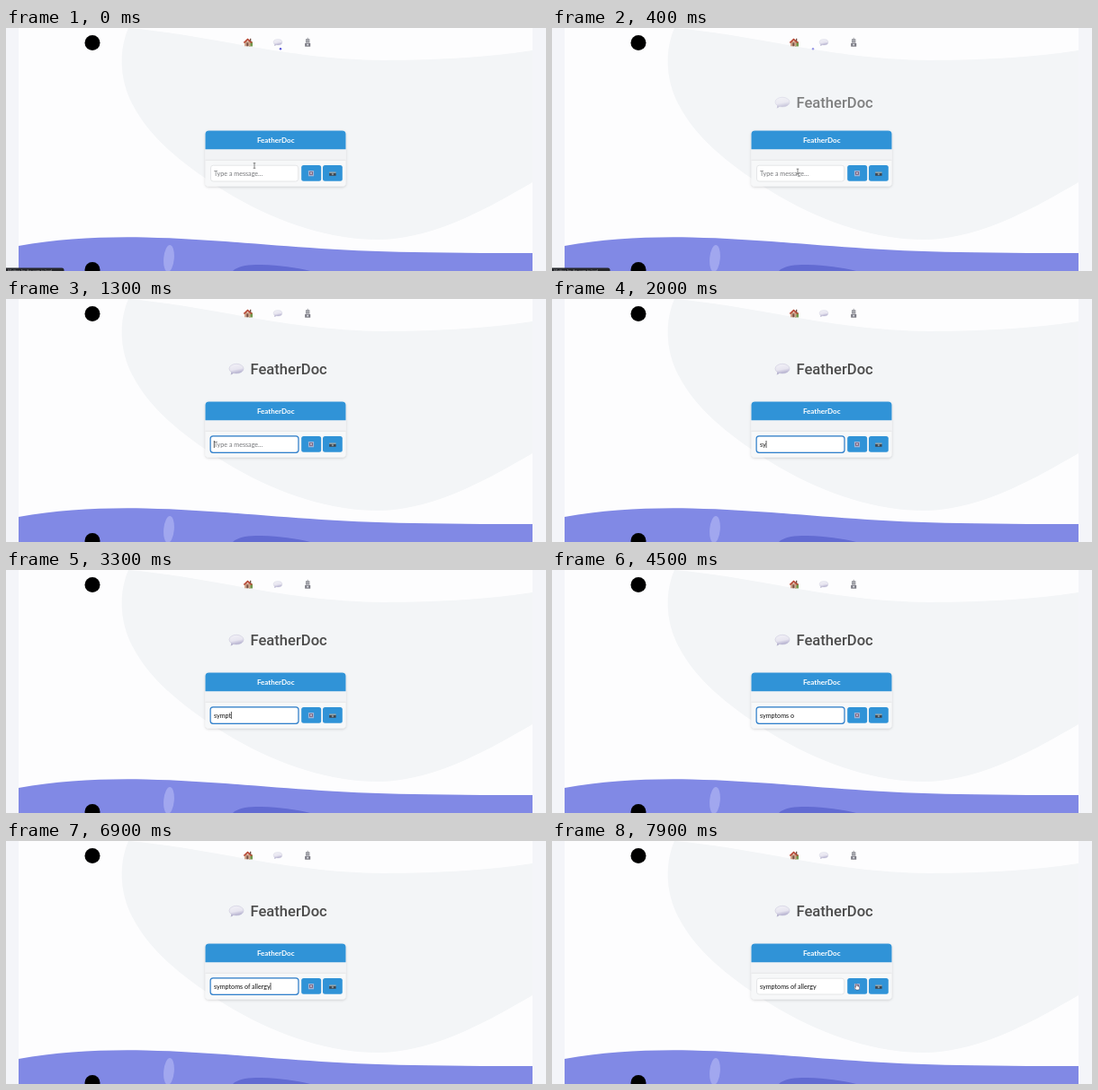
An HTML page for the animation above (8000 ms loop, 600 px wide and 271 px high).

```html
<!DOCTYPE html>
<html lang="en">
<head>
<meta charset="utf-8">
<title>Chat page</title>
<style>
  html, body { margin: 0; width: 100%; height: 100%; overflow: hidden; background: #f4f5f9; }
  svg { display: block; width: 100%; height: 100%; }
  text { font-family: Lato, sans-serif; white-space: pre; }
</style>
</head>
<body>
<svg viewBox="0 0 600 271">
  <defs>
    <linearGradient id="puff" x1="0" y1="0" x2="0.3" y2="1">
      <stop offset="0" stop-color="#f3f2f8"/>
      <stop offset=".65" stop-color="#e7e5f0"/>
      <stop offset="1" stop-color="#b9b5d2"/>
    </linearGradient>
    <filter id="shadow" x="-10%" y="-20%" width="120%" height="140%">
      <feDropShadow dx="0" dy="1" stdDeviation="1.8" flood-color="#000" flood-opacity=".17"/>
    </filter>
    <g id="bubble">
      <path d="M-2.500 4Q-5 6.500-6.500 6.600Q-5.500 5-5.800 3Z" fill="#b5b1cd"/>
      <ellipse cy="-.3" rx="8" ry="5.400" fill="url(#puff)" stroke="#c3c0d6" stroke-width=".5"/>
    </g>
    <clipPath id="page"><path d="M14 0H585V271H14Z"/></clipPath>
  </defs>

  <rect width="600" height="271" fill="#f4f5f9"/>
  <g clip-path="url(#page)">
    <rect x="14" width="571" height="271" fill="#fdfdfe"/>
    <path fill="#f3f5f7" d="M136 0C125 26 126 58 141 86C158 119 190 146 222 168C280 209 350 236 414 236C475 235 532 203 585 172V25C530 33 480 36 420 36C310 35 235 9 136 0Z"/>
    <path fill="#8189e5" d="M14 243C60 235 105 232.500 155 233.500C260 236 330 249 470 250.300C510 250.800 550 251 585 251V271H14Z"/>
    <ellipse cx="181" cy="257" rx="5.800" ry="15" fill="#a1a7ef" transform="rotate(5 181 257)"/>
    <path fill="#626bd2" d="M252 271C258 265 270 263.800 284 264C304 264.500 322 267 338 271Z"/>
  </g>

  <circle cx="96" cy="16.500" r="8.500"/>
  <circle cx="96" cy="269.500" r="8.500"/>

  <!-- Navigation -->
  <g>
    <path fill="#70984c" d="M270 15.500h4v5h-4z"/>
    <path fill="#d0a58c" d="M265 15h6.500v5.300h-6.500z"/>
    <path fill="#b84b38" d="M263.700 16L268.500 11.400L274 16L272.500 17L268.500 14L265 17Z"/>
    <path fill="#765045" d="M267.300 16.500h2v3.800h-2zM271 11.700h1.300v3H271z"/>
  </g>
  <use href="#bubble" transform="translate(302 16) scale(.6)"/>
  <g fill="#92939a">
    <path d="M333 12.300h4.400v4.200H333zM334.800 10.800h.8v2h-.8z"/>
    <path fill="#777780" d="M332.200 16.900h6v3.800h-6z"/>
    <path fill="#d9dce2" d="M333.800 13.700h1v1h-1zM335.700 13.700h1v1h-1zM334.100 17.700h2.200v1.700h-2.200z"/>
  </g>
  <circle id="dot" cy="23.200" r="1.200" fill="#5755d8"/>

  <g id="title">
    <use href="#bubble" x="256" y="78"/>
    <text x="271.500" y="84" fill="#4c4c4c" style="font:500 16.600px Roboto,sans-serif">FeatherDoc</text>
  </g>

  <!-- Chat card -->
  <rect x="221.500" y="114.500" width="156" height="62" rx="4" fill="#f7f8f9" filter="url(#shadow)"/>
  <path fill="#f2f3f5" d="M221.500 135h156v12.300h-156z"/>
  <path fill="#3093d7" d="M221.500 135.200V118.500a4 4 0 0 1 4-4H373.500a4 4 0 0 1 4 4V135.200Z"/>
  <path stroke="#dedfe1" stroke-width=".7" d="M221.500 147.300h156"/>
  <text x="299.700" y="127.800" font-size="8" font-weight="700" fill="#fff" text-anchor="middle">FeatherDoc</text>

  <rect x="227.500" y="153.200" width="97.200" height="17.800" rx="2.800" fill="#fff" stroke="#dcdde0" stroke-width=".7"/>
  <rect id="ring" x="227.100" y="152.800" width="97.900" height="18.500" rx="3" fill="none" stroke="#2f80cd" stroke-width="1.200"/>
  <text id="entry" x="231" y="164.500" font-size="7.150"></text>
  <path id="caret" stroke="#111" stroke-width=".7" d="M0 158v8"/>

  <g fill="#3093d7">
    <rect x="328.200" y="152.900" width="22" height="17.900" rx="2.500"/>
    <rect x="352" y="152.900" width="21.800" height="17.900" rx="2.500"/>
  </g>
  <path fill="#9fb3d6" d="M335.900 159h6.200v6.300h-6.200z"/>
  <path fill="#7d6480" d="M337 160.200h4v3.600h-4z"/>
  <path fill="#d5d7e3" d="M338.200 161.100h1.600v1.700h-1.600z"/>
  <path fill="#3f4750" d="M359.200 161.500h7.400v3.300h-7.400z"/>
  <path fill="#a9aaa6" d="M359.200 160.500h7.400v1.300h-7.400z"/>
  <circle cx="362.900" cy="163.100" r="1.200" fill="#81939d"/>

  <path id="beam" fill="none" stroke="#555" stroke-width=".7" d="M-1.300-2.800H1.300M0-2.800V2.800M-1.300 2.800H1.300"/>
  <path id="hand" fill="#fff" stroke="#3a2634" stroke-width=".4" d="M0 0q.7-.6 1.200 0V2.200L4 3V5.200L3.200 6.500H.4L-1.500 3.700L-.8 3.200L0 4Z"/>

  <g id="status">
    <path fill="#25262a" d="M0 267.500h62q2.500 0 2.500 2.500v1H0Z"/>
    <text x="2" y="271.500" font-size="4" fill="#aaa">Waiting for the page to load</text>
  </g>
</svg>
<script>
const $ = id => document.getElementById(id);
const LOOP = 8000, STEP = 100;
const phrase = "symptoms of allergy";
const keyTimes = [1500, 1800, 2500, 2800, 3200, 3400, 3500, 3700, 3800, 4000,
                  4700, 5000, 5300, 5500, 5700, 5900, 6100, 6300, 6700];
const caretGaps = [[2300, 2500], [4500, 4700], [6100, 6300], [7200, LOOP]];

const clamp = v => Math.max(0, Math.min(1, v));
const mix = (a, b, p) => a + (b - a) * p;
const show = (el, on) => el.setAttribute("visibility", on ? "visible" : "hidden");
const move = (el, x, y) => el.setAttribute("transform", `translate(${x} ${y})`);

function draw(t) {
  const rise = 1 - (1 - clamp((t - 100) / 800)) ** 2.5;
  $("title").setAttribute("opacity", rise);
  move($("title"), 0, 16 * (1 - rise));

  $("dot").setAttribute("cx", 305 - t * 0.0375);
  $("dot").setAttribute("opacity", clamp(1 - (t / 640) ** 2));

  show($("beam"), t < 700);
  show($("status"), t < 700);
  const slide = clamp(t / 400);
  move($("beam"), mix(276, 273, slide), mix(153.5, 160, slide));

  const focused = t >= 1200 && t < 7700;
  $("ring").setAttribute("opacity", focused ? clamp((t - 1100) / 200) : 0);

  const typed = phrase.slice(0, keyTimes.filter(k => k <= t).length);
  const entry = $("entry");
  entry.textContent = typed || "Type a message...";
  entry.setAttribute("fill", typed ? "#111" : "#75777a");

  const width = typed ? entry.getComputedTextLength() : 0;
  move($("caret"), 231.3 + width, 0);
  show($("caret"), focused && !caretGaps.some(([a, b]) => t >= a && t < b));

  show($("hand"), t >= 7200);
  move($("hand"), t < 7500 ? 336.5 : 337.5, 159.5);
}

const start = performance.now();
function frame(now) {
  const t = Math.max(0, now - start) % LOOP;
  draw(Math.floor(t / STEP) * STEP);
  requestAnimationFrame(frame);
}
draw(0);
requestAnimationFrame(frame);
</script>
</body>
</html>
```
